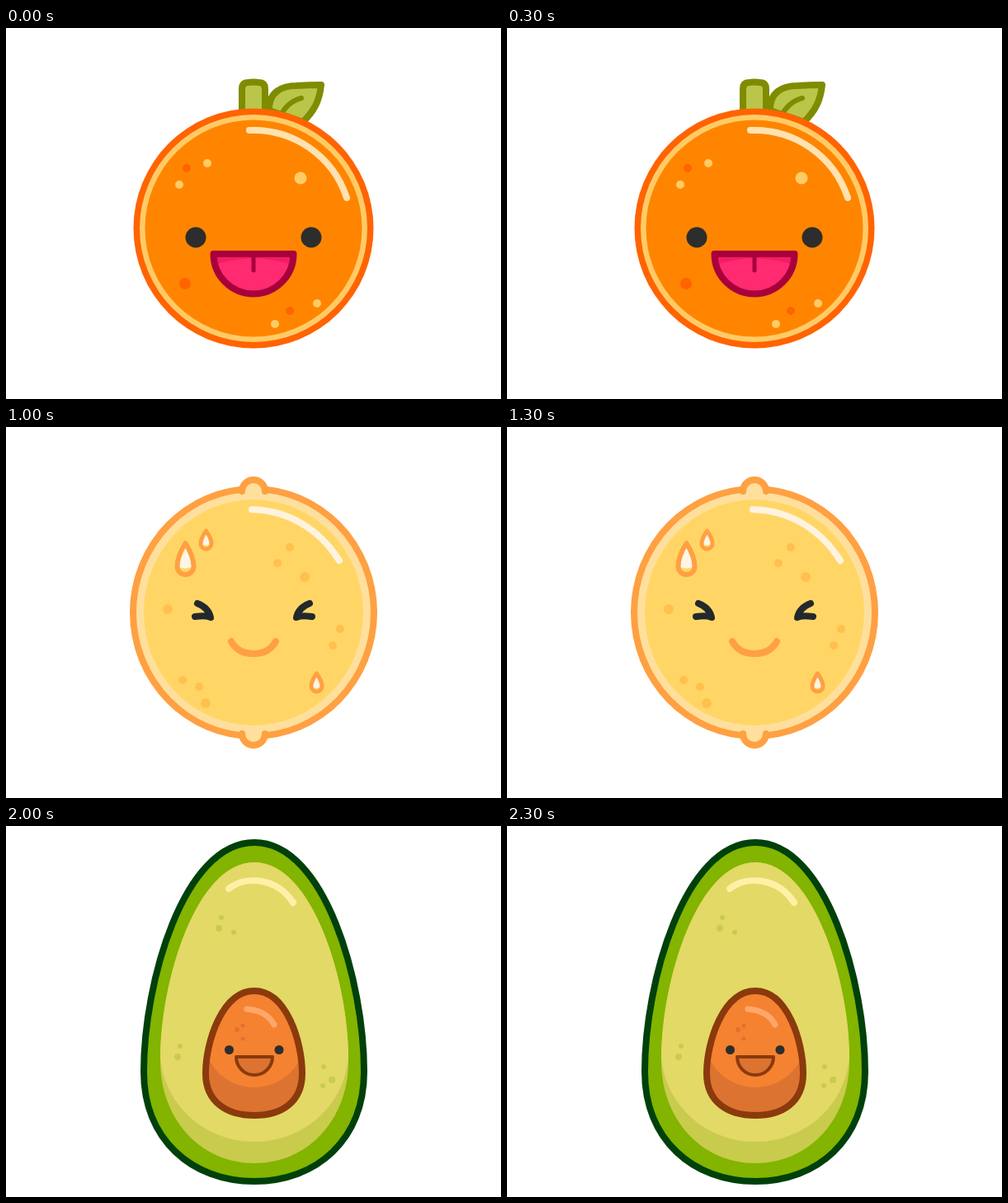
Recreate the animation shown at these times as an HTML page with a canvas. Size 600 px wide and 450 px high, loop 2500 ms.

```html
<!DOCTYPE html>
<html lang="en">
<head>
<meta charset="utf-8">
<title>Happy fruit</title>
<style>
html, body { margin: 0; width: 100%; height: 100%; overflow: hidden; background: #fff; }
canvas { display: block; }
</style>
</head>
<body>
<canvas id="stage" width="600" height="450"></canvas>
<script>
const ctx = document.getElementById('stage').getContext('2d');
const HOLD = 500;
const INK = '#2d2d2d';

function shape(d, fill, stroke, width = 8) {
  const path = new Path2D(d);
  if (fill) {
    ctx.fillStyle = fill;
    ctx.fill(path);
  }
  if (stroke) {
    ctx.strokeStyle = stroke;
    ctx.lineWidth = width;
    ctx.stroke(path);
  }
}

const line = (d, color, width) => shape(d, null, color, width);

function oval(x, y, rx, ry, fill) {
  ctx.beginPath();
  ctx.ellipse(x, y, rx, ry, 0, 0, Math.PI * 2);
  ctx.fillStyle = fill;
  ctx.fill();
}

const dots = (color, list) => list.forEach(([x, y, r]) => oval(x, y, r, r, color));

function box(x, y, w, h, r, fill) {
  ctx.beginPath();
  ctx.roundRect(x, y, w, h, r);
  ctx.fillStyle = fill;
  ctx.fill();
}

function clipped(d, draw) {
  ctx.save();
  ctx.clip(new Path2D(d));
  draw();
  ctx.restore();
}

// Draws once as is and once flipped around the vertical line x = axis.
function mirrored(axis, draw) {
  draw();
  ctx.save();
  ctx.translate(axis * 2, 0);
  ctx.scale(-1, 1);
  draw();
  ctx.restore();
}

const grin = (x, y, rx, ry) => `M${x - rx} ${y}H${x + rx}A${rx} ${ry} 0 0 1 ${x - rx} ${y}Z`;
const arcEye = (x, y, r, sweep) => line(`M${x - r} ${y}A${r} ${r} 0 0 ${sweep} ${x + r} ${y}`, INK);

function orange() {
  const rim = '#ff6400', pale = '#ffcb66', green = '#7f8c00', leaf = '#b9c64a';
  shape('M286 108V74Q286 66 294 66Q300 65 306 66Q314 66 314 74V108Z', leaf, green);
  shape('M319 100C318 78 334 70 352 70Q368 69 382 69C380 88 374 100 360 114Z', leaf, green);
  line('M332 108Q340 90 358 85', green, 6);
  dots(rim, [[300, 243, 145.5]]);
  dots(pale, [[300, 243, 138]]);
  dots('#ff8500', [[300, 243, 131.5]]);
  line('M295 124A119 119 0 0 1 413 206', '#ffe2b0');
  dots(rim, [[219, 170, 5], [217, 310, 7], [344, 343, 5]]);
  dots(pale, [[244, 164, 5], [210, 190, 5], [357, 182, 7.5], [326, 359, 5], [377, 334, 5]]);
  dots(INK, [[230, 254, 12.5], [370, 254, 12.5]]);

  const mouth = grin(300, 274, 48.5, 48.5);
  shape(mouth, '#ff2a70');
  clipped(mouth, () => shape('M250 274H350V288Q326 280 300 279Q274 280 250 288Z', '#f21c64'));
  line('M300 276V294', '#a8003d', 5);
  line(mouth, '#a8003d');
}

function strawberry() {
  const rim = '#f70008';
  const body = 'M300 385C250 385 158 290 158 200C158 165 185 142 215 133H385C420 142 442 165 442 200C442 290 350 385 300 385Z';
  shape(body, '#ff2a2a');
  clipped(body, () => line(body, '#ff7878', 24));
  line(body, rim);
  line('M392 156C425 180 430 225 388 289', '#ff9494');
  [[193, 159], [171, 203], [259, 196], [207, 229], [302, 229], [347, 201], [384, 221],
   [429, 201], [226, 292], [271, 334], [353, 334], [404, 293], [312, 366]]
    .forEach(([x, y]) => oval(x, y, 4, 7, '#f00008'));

  ctx.lineJoin = 'miter';
  line('M240 170L283 154L300 181L317 154L360 170', rim, 13);
  ctx.lineJoin = 'round';
  mirrored(300, () => shape('M198 138L250 128L222 156Z', rim));
  shape('M286 102V74Q286 65 296 65H304Q314 65 314 74V102C362 102 406 115 446 139' +
    'Q395 131 345 127L407 192Q360 166 317 150L300 178L283 150Q240 166 193 192' +
    'L255 127Q205 131 154 139C194 115 238 102 286 102Z', '#00993a', '#00781c');

  arcEye(230, 254, 12, 1);
  arcEye(370, 254, 12, 1);
  shape(grin(300, 274, 48.5, 48.5), '#ff3575', '#9b0043');
}

function drop(x, y, w, h, line = 5) {
  const r = w / 2;
  const d = `M${x} ${y}Q${x - r} ${y + h * .42} ${x - r} ${y + h - r}` +
    `A${r} ${r} 0 0 0 ${x + r} ${y + h - r}Q${x + r} ${y + h * .42} ${x} ${y}Z`;
  shape(d, '#ffd666');
  clipped(d, () => oval(x, y + h * .4, w, h * .4, '#fff5e4'));
  shape(d, null, '#ffa042', line);
}

function lemon() {
  const rim = '#ffa042', pale = '#ffdf9c';
  oval(300, 225, 150, 154, rim);
  oval(300, 225, 142, 146, pale);
  oval(300, 225, 133, 137, '#ffd666');
  const nubs = ['M286 78A14 14 0 0 1 314 78', 'M286 372A14 14 0 0 0 314 372'];
  nubs.forEach((d, i) => {
    shape(d + (i ? 'V365H286Z' : 'V85H286Z'), pale);
    line(d, rim);
  });
  line('M298 100C342 101 380 124 404 162', '#fff3e0');
  dots('#ffc04d', [[344, 146, 5], [329, 165, 5], [362, 182, 6], [196, 221, 6], [405, 245, 5],
    [396, 265, 5], [214, 307, 5], [234, 315, 5], [242, 335, 6]]);
  drop(217.5, 141, 20, 38, 6);
  drop(242.5, 126, 13, 22);
  drop(376.5, 299, 13, 22);
  mirrored(300, () => line('M232 214C240 217 246 222 248 231Q242 228 229 230', '#22292d'));
  line('M273 260Q281 275 300 275Q319 275 327 260', rim);
}

function pineapple() {
  const edge = '#00a000', light = '#12ca50', shade = '#0bb83a';
  mirrored(299, () => {
    shape('M232 165C220 145 212 118 220 113C230 109 240 122 250 140V165Z', light, edge);
  });
  mirrored(298, () => {
    const leaf = 'M244 150C238 110 235 48 247 44C260 42 268 80 276 110V150Z';
    shape(leaf, light);
    clipped(leaf, () => shape('M240 160Q246 115 266 75H280V160Z', shade));
    line(leaf, edge);
  });
  const tall = 'M282 155C276 100 277 20 298 14C319 20 320 100 314 155Z';
  shape(tall, light);
  clipped(tall, () => shape('M270 75Q300 85 312 110V160H270Z', shade));
  line(tall, edge);

  box(183, 144, 235, 297.5, 113, '#ffad00');
  box(191.5, 152.5, 218.5, 281, 104.5, '#ffee99');
  ctx.save();
  box(200, 161, 201.5, 264, 96, '#ffd300');
  ctx.clip();
  for (let y = 50; y <= 530; y += 80) {
    mirrored(299.5, () => line(`M175 ${y - 124}L424 ${y + 124}`, '#ffb000', 8.5));
  }
  ctx.restore();
  line('M328 182C364 190 390 217 390 258', '#fff3b8');

  const front = 'M269 85C283 86 298 115 304 142C307 155 298 163 287 163C276 163 270 154 267 140C262 115 261 88 269 85Z';
  shape(front, light);
  clipped(front, () => shape('M255 80L273 90Q268 135 284 168H255Z', shade));
  line(front, edge);

  arcEye(230.5, 301, 12.5, 0);
  arcEye(372.5, 301, 12.5, 0);
  const mouth = grin(301.5, 335, 48.5, 49.5);
  shape(mouth, '#ffad00');
  shape('M267 337H300V348Q300 360 288 360H279Q267 360 267 348Z', '#e2e2e6');
  shape('M275 337H294V344Q294 351 287 351H282Q275 351 275 344Z', '#f5f5f7');
  line(mouth, '#ff7000');
}

function avocado() {
  const olive = '#c9cb4d', bark = '#8a3a0c', dim = '#dd7330';
  shape('M301 20C215 20 167 190 167 298C167 380 225 431 301 431C377 431 434 380 434 298C434 190 387 20 301 20Z',
    '#82b400', '#00400a');
  shape('M301 44C230 44 187 190 187 285C187 355 235 409 301 409C367 409 415 355 415 285C415 190 372 44 301 44Z', olive);
  shape('M301 44C230 44 187 190 187 280C192 340 242 383 301 383C360 383 410 340 415 280C415 190 372 44 301 44Z', '#e3d966');
  line('M270 76C290 60 328 62 348 93', '#fff0a8');
  dots(olive, [[261, 111, 3], [258, 124, 4], [276, 129, 3], [211, 267, 3], [208, 280, 4],
    [385, 292, 3], [395, 308, 4], [384, 315, 3]]);

  const pit = 'M301 200C262 200 242 262 242 300C242 335 268 351 301 351C334 351 359 335 359 300C359 262 340 200 301 200Z';
  shape(pit, dim);
  clipped(pit, () => oval(301, 255, 62, 62, '#f58231'));
  line(pit, bark);
  line('M292 222Q316 224 325 241', '#ffa76a', 7);
  dots(dim, [[287, 242, 2.5], [280, 247, 3], [287, 258, 2.5]]);
  dots(INK, [[270.5, 271.5, 5.5], [331, 271.5, 5.5]]);
  shape(grin(301, 280, 22, 22), dim, bark, 4);
}

const scenes = [orange, strawberry, lemon, pineapple, avocado];

function render() {
  const index = Math.floor(performance.now() / HOLD) % scenes.length;
  ctx.fillStyle = '#fff';
  ctx.fillRect(0, 0, 600, 450);
  ctx.lineCap = ctx.lineJoin = 'round';
  scenes[index]();
  requestAnimationFrame(render);
}
render();
</script>
</body>
</html>
```
